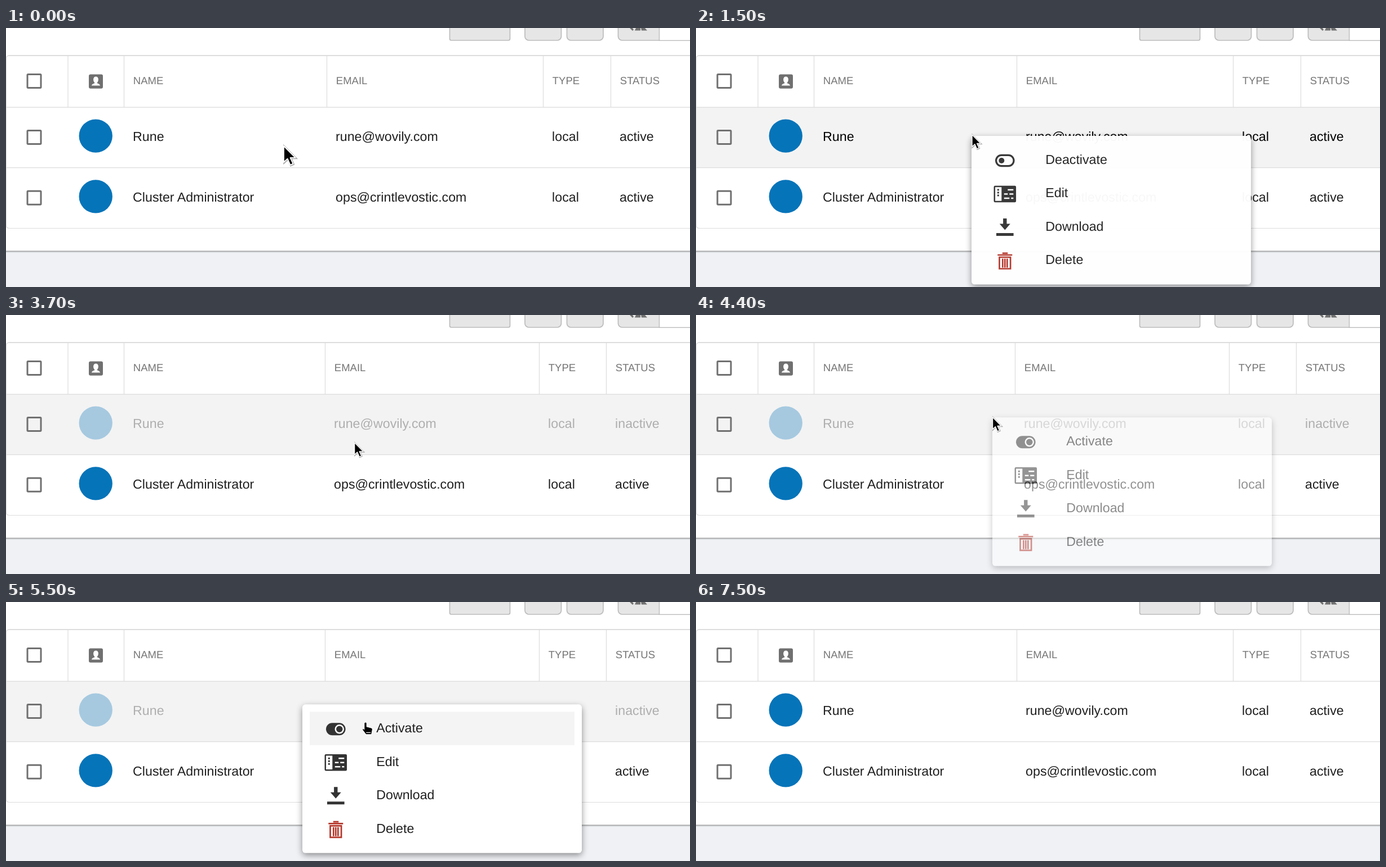
Write an HTML page that moves like this. It is 1214 by 461 pixels and loops after 8500 ms.

```html
<!DOCTYPE html>
<html lang="en">
<head>
<meta charset="utf-8">
<title>User list</title>
<style>
  html, body { margin: 0; width: 100%; height: 100%; overflow: hidden; background: #fff; }
  svg { display: block; width: 1214px; height: 461px; }
  text { font: 23.2px "Liberation Sans", Arial, sans-serif; text-rendering: geometricPrecision; white-space: pre; }
  .head { font-size: 18.5px; fill: #757575; }
  .menu { filter: drop-shadow(0 4px 6px rgba(0, 0, 0, .42)); }
</style>
</head>
<body>
<svg id="stage" viewBox="0 0 1214 461"></svg>
<script>
const LOOP = 8500, STEP = 100;
const stage = document.getElementById('stage');

// Cursor path: time, x, y, scale
const path = [
  [500, 493, 210, 1.65], [900, 490, 190, 1.22],
  [1700, 490, 190, 1.22], [2500, 626, 231, 1.22],
  [3600, 626, 231, 1.22], [4200, 526.5, 182, 1.22],
  [4700, 526.5, 182, 1.22], [5800, 662, 221, 1.22]
];

const rect = (x, y, w, h, fill, more = '') =>
  `<rect x="${x}" y="${y}" width="${w}" height="${h}" fill="${fill}" ${more}/>`;
const shape = (d, fill, more = '') => `<path d="${d}" fill="${fill}" ${more}/>`;
const line = (d, color, width) => shape(d, 'none', `stroke="${color}" stroke-width="${width}"`);
const dot = (x, y, r, fill, more = '') => `<circle cx="${x}" cy="${y}" r="${r}" fill="${fill}" ${more}/>`;
const label = (x, y, s, more = 'fill="#1f1f1f"') => `<text x="${x}" y="${y}" ${more}>${s}</text>`;
const group = (body, more) => `<g ${more}>${body}</g>`;
const at = (x, y, body, scale = 1) => group(body, `transform="translate(${x} ${y}) scale(${scale})"`);

function cursorAt(t) {
  if (t <= path[0][0]) return path[0].slice(1);
  const i = path.findIndex(k => k[0] > t);
  if (i < 0) return path[path.length - 1].slice(1);
  const a = path[i - 1], b = path[i];
  const p = (t - a[0]) / (b[0] - a[0]), e = p * p * (3 - 2 * p);
  return [1, 2, 3].map(n => a[n] + (b[n] - a[n]) * e);
}

const checkbox = y => rect(38, y - 12, 24, 24, 'none', 'rx="1.2" stroke="#707070" stroke-width="3"');

function toolbar() {
  const button = (x, w, r) => rect(x, -20, w, 42, '#e6e6e6', `rx="${r}" stroke="#bcbcbc" stroke-width="1.7"`);
  return button(787.5, 107, 3) + button(921, 64.5, 7) + button(995.5, 64.5, 7) + button(1086.5, 140, 7) +
    rect(1159.5, -2, 70, 24.3, '#fff', 'stroke="#bcbcbc" stroke-width="1.4"') +
    shape('M1107 0h5l2 3-2 2zM1116 4.5l2-4.5h8v4.5zM1127 0h7l4 4.5h-10z', '#707070');
}

function row(y, cols, cells, ink, faded) {
  const body = dot(159.2, y - 1.9, 29.7, '#0674b9') +
    cells.map((s, i) => label(cols[i] + 15.6, y + 7.2, s, `fill="${ink}"`)).join('');
  return checkbox(y + .5) + group(body, `opacity="${faded ? .32 : 1}"`);
}

function table(t) {
  const off = t >= 2900 && t < 6900, hover = t >= 600 && t < 7300;
  const cols = off ? [209.5, 566.5, 946.5, 1065.5] : [209.5, 569.5, 953.5, 1073.5];
  const grid = [110, ...cols].map(x => `M${x} 49V141`).join('');
  return (hover ? rect(1, 141, 1213, 107.5, '#f3f3f3') : '') +
    line(`M1214 49.2H6Q.5 49.2 .5 54V351Q.5 356.5 6 356.5H1214M0 141.2H1214M0 248.7H1214${grid}`, '#dcdcdc', 1.2) +
    line('M4 49H1214', '#d2d2d2', 1) +
    checkbox(94.5) +
    rect(147, 82.5, 25, 25.3, '#707070', 'rx="3"') +
    shape('M159.5 86.5c5.5 0 5.5 8 2 11c0 1.500 5 1.500 5.500 5h-15c.5-3.500 5.500-3.500 5.500-5c-3.500-3-3.500-11 2-11z', '#fff') +
    ['NAME', 'EMAIL', 'TYPE', 'STATUS'].map((s, i) => label(cols[i] + 16.3, 100, s, 'class="head"')).join('') +
    row(194, cols, ['Rune', 'rune@wovily.com', 'local', off ? 'inactive' : 'active'],
      t >= 1300 && t < 2900 ? '#000' : '#1f1f1f', off) +
    row(301.8, cols, ['Cluster Administrator', 'ops@crintlevostic.com', 'local', 'active'], '#1f1f1f');
}

// Icons are centred on 0,0
const dark = '#333', red = '#b5382c';
const icons = {
  Deactivate: rect(-15.7, -9.7, 31.4, 19.4, '#fff', `rx="9.7" stroke="${dark}" stroke-width="3.2"`) + dot(-6, 0, 5, dark),
  Activate: rect(-17.3, -11, 34.6, 22, dark, 'rx="11"') + dot(6.5, 0, 7, dark, 'stroke="#fff" stroke-width="2.5"'),
  Edit: rect(-18.5, -13.5, 37, 27, '#fff', `rx="1" stroke="${dark}" stroke-width="2.5"`) +
    rect(-6, -13.5, 25, 27, dark) +
    [-9, -4, 1].map(y => rect(-13.5, y, 3, 3, dark)).join('') +
    line('M5 -7.5H15M-1.5 0H5M8 0H15M-1.5 7.5H8M11 7.5H15', '#fff', 2.5),
  Download: shape('M-3.2-16h6.4v9.5h6.3L0 4.5l-9.5-11h6.3zM-15.3 10h30.6v5h-30.6z', dark),
  Delete: line('M-13 -10.5H13M-4.5 -13.7H5M-9.8 -6.5V14H9.8V-6.5ZM-4 -4V12M0 -4V12M4 -4V12', red, 2.7)
};

function menu(x, y, first, opacity, hover) {
  const items = [first, 'Edit', 'Download', 'Delete'].map((name, i) => {
    const top = i * 59.5;
    return at(59.3, top + 44, icons[name]) + label(131.3, top + 49.8, name);
  });
  const body = rect(0, 0, 496, 264.5, '#fff', 'rx="5.5" class="menu"') +
    (hover ? rect(13, 13, 470, 59.5, '#f4f4f4') : '') + items.join('');
  return group(at(x, y, body), `opacity="${opacity}"`);
}

const outline = 'M0 0V17.5L4 13.7L7 20.5L10 19.2L7 12.7H12.5Z';
const arrow = at(.5, .5, line(outline, '#a8a8a8', 1.9)) +
  shape(outline, '#000', 'stroke="#fff" stroke-width="1.1" stroke-linejoin="round"');
const hand = shape('M0 0c1.5 0 2 1 2 2v6l8 2c2 .5 2.5 2 2 4l-1.5 8h-10l-6-8c-1-2 1-3 3-1.5v-10.5c0-1 1-2 2.5-2z',
  '#000', 'stroke="#fff" stroke-width="1.2"') + line('M1 18.5H9', '#fff', 1.2);

function scene(t) {
  const [x, y, scale] = cursorAt(t);
  let out = rect(0, 0, 1214, 461, '#eff1f5') +
    rect(0, 398, 1214, 2, '#d9dbde') + rect(0, 0, 1214, 398, '#9c9c9c') + rect(0, 0, 1214, 396.6, '#fff') +
    toolbar() + table(t);

  const open = [[1300, 2900, 489, 192, 'Deactivate'], [4400, 6700, 526, 182.3, 'Activate']]
    .find(m => t >= m[0] && t < m[1]);
  let over = false;
  if (open) {
    const [start, end, mx, my, first] = open;
    const p = Math.min(1, (t - start + STEP) / 400);
    over = x > mx + 13 && y > my + 13;
    out += menu(mx, my, first, 1 - (1 - p) ** 2.5, over);
    if (t >= end - STEP) out += dot(x, y + 1, 9.5, 'rgba(0,0,0,.08)');
  }

  const shown = t < 7300 ? 1 : Math.max(0, 1 - (t - 7200) / 300);
  return out + group(over ? at(x + 1, y, hand) : at(x, y, arrow, scale), `opacity="${shown}"`);
}

let last = -1;
function tick() {
  const t = Math.floor(performance.now() % LOOP / STEP) * STEP;
  if (t !== last) stage.innerHTML = scene(last = t);
  requestAnimationFrame(tick);
}
tick();
</script>
</body>
</html>
```
